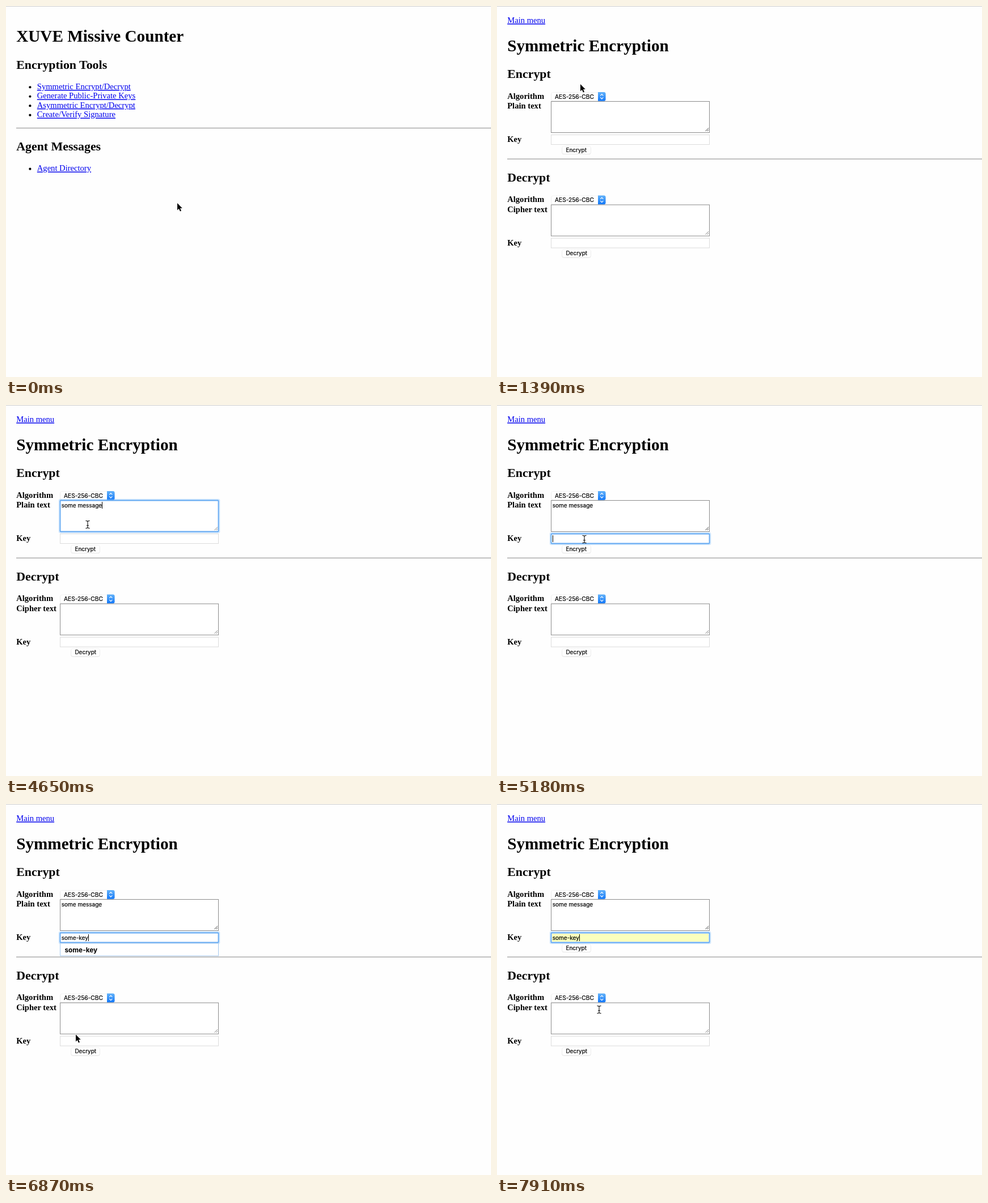
An HTML page for the animation above (7.99 s loop, 855x655 px).

```html
<!DOCTYPE html>
<html lang="en">
<head>
<meta charset="utf-8">
<title>Symmetric encryption walkthrough</title>
<style>
  html, body { margin: 0; width: 100%; height: 100%; overflow: hidden; background: #fefefe; }
  svg { display: block; width: 855px; height: 655px; }
  text { font-family: "Liberation Serif", serif; font-size: 14.6px; white-space: pre; }
  .h1 { font-size: 29.2px; font-weight: bold; }
  .h2 { font-size: 21.9px; font-weight: bold; }
  .label { font-weight: bold; }
  .link { fill: #0000ee; text-decoration: underline; text-decoration-skip-ink: none; }
  .ui, .choice { font-family: Inter, sans-serif; font-size: 10px; stroke: #000; stroke-width: .2px; }
  .choice { font-size: 10.2px; }
  .option { font-family: Inter, sans-serif; font-size: 11.8px; font-weight: bold; }
</style>
</head>
<body>
<svg id="stage" viewBox="0 0 855 655">
  <defs>
    <linearGradient id="blue" x2="0" y2="1">
      <stop offset="0" stop-color="#62b2fa"/>
      <stop offset="1" stop-color="#1277f8"/>
    </linearGradient>
  </defs>
</svg>
<script>
const LOOP = 7990, STEP = 85, BLINK = 540;
const OPEN = 1390, FOCUS_TEXT = 1960, FOCUS_KEY = 5180, PICK = 7570;
const LEFT = 18.2, FORM_GAP = 182.5, LINE = 16.45;

const stage = document.getElementById('stage');
const text = (x, y, cls, s) => `<text x="${x}" y="${y}" class="${cls}">${s}</text>`;
const rect = (x, y, w, h, attrs) => `<rect x="${x}" y="${y}" width="${w}" height="${h}" ${attrs}/>`;
const group = (id, ...parts) => `<g id="${id}">${parts.join('')}</g>`;
const rule = y => rect(18, y, 837, 1.2, 'fill="#999"');
const grip = y => `<path d="M367.5 ${y + 53}l5.5-5.5m-2.5 5.5l2.5-2.5" stroke="#777" stroke-width=".9"/>`;
const list = (y, ...names) => names.map((s, i) =>
  `<circle cx="42.4" cy="${y + i * LINE - 3.7}" r="2.1"/>` + text(54.8, y + i * LINE, 'link', s)).join('');

// white control with a soft lower edge
const raised = (x, y, w, h) => rect(x, y + 1, w, h, 'rx="3.5" fill="#dcdcdc"') +
  rect(x + .3, y + .5, w - .6, h - .3, 'rx="3" fill="#fff" stroke="#ececec" stroke-width=".6"');

const button = (y, s) => raised(114.5, y, 51, 14) + text(121.4, y + 10.6, 'ui', s);

const select = y => raised(95.5, y, 96, 15.3) +
  `<path d="M178 ${y}h10.5a3 3 0 0 1 3 3v9.8a3 3 0 0 1-3 3H178z" fill="url(#blue)"/>` +
  `<path d="M182.3 ${y + 6.4}l2.5-2.7 2.5 2.7m-5 3l2.5 2.7 2.5-2.7" fill="none" stroke="#fff" stroke-width="1.2"/>` +
  text(102, y + 11.8, 'choice', 'AES-256-CBC');

const form = (dy, title, label) => `<g transform="translate(0 ${dy})">` +
  text(LEFT, 127, 'h2', title) +
  text(LEFT, 163.7, 'label', 'Algorithm') +
  text(LEFT, 181, 'label', label) +
  text(LEFT, 240.2, 'label', 'Key') +
  select(152) +
  rect(95.5, 168.5, 279, 55, 'fill="#fff" stroke="#8c8c8c"') + grip(168) +
  rect(95.5, 227.5, 279, 17, 'fill="#fff" stroke="#dcdcdc"') +
  button(247, title) + '</g>';

const ring = (id, y, h) => group(id,
  rect(95, y, 280, h, 'rx="1" fill="none" stroke="#7ab9f8" stroke-opacity=".35" stroke-width="4.6"'),
  rect(95.5, y + .5, 279, h - 1, 'rx="1" fill="#fff" stroke="#62a8f2" stroke-width="1.8"'));

stage.innerHTML += rect(0, 0, 855, 1, 'fill="#cfcfcf"') +
  group('menu',
    text(LEFT, 63, 'h1', 'XUVE Missive Counter'),
    text(LEFT, 110.5, 'h2', 'Encryption Tools'),
    list(147, 'Symmetric Encrypt/Decrypt', 'Generate Public-Private Keys',
      'Asymmetric Encrypt/Decrypt', 'Create/Verify Signature'),
    rule(214.9),
    text(LEFT, 255, 'h2', 'Agent Messages'),
    list(291.4, 'Agent Directory')) +
  group('page',
    text(LEFT, 30, 'link', 'Main menu'),
    text(LEFT, 79.5, 'h1', 'Symmetric Encryption'),
    form(0, 'Encrypt', 'Plain text'),
    rule(269.5),
    form(FORM_GAP, 'Decrypt', 'Cipher text'),
    ring('ringPlain', 168, 56), ring('ringKey', 227, 18), grip(168),
    rect(97, 229, 276, 14, 'id="filled" fill="#faffbd"'),
    group('plain', text(97.8, 181, 'ui', '')),
    group('key', text(97.8, 240.2, 'ui', '')),
    group('drop', rect(95.5, 246, 279, 22, 'id="row" stroke="#a5c9ee"'), text(103.5, 262, 'option', 'some-key')),
    rect(0, 0, 1, 12, 'id="caret"')) +
  group('cursor',
    '<path id="arrow" transform="scale(.94)" d="M0 0V13.2L3 10.5 5.2 15.4 7.4 14.5 5.3 9.6H9.3Z" stroke="#fff" stroke-width="1.2" paint-order="stroke"/>',
    '<path id="beam" d="M-3.5-6.6Q-.4-6.6 0-5.2Q.4-6.6 3.5-6.6M0-5.2V5.2M-3.5 6.6Q-.4 6.6 0 5.2Q.4 6.6 3.5 6.6M-2 1.8H2" fill="none" stroke="#111" stroke-width="1.1"/>',
    '<path id="hand" d="M-1.2 8V1.2a1.2 1.2 0 0 1 2.4 0V6q.2-1.5 1.4-1.4t1.2 1.5q.3-1.1 1.4-1t1.1 1.4q.4-.8 1.3-.6t.9 1.6V11q0 1.4-1.1 2.6V15H0V13.4L-4 9.2q-.7-1.2.4-1.7t2.4 1.7Z" fill="#fff" stroke="#111"/>');

const ui = {};
for (const el of stage.querySelectorAll('[id]')) ui[el.id] = el;

const glide = (start, steps, x, y) => ({ start, steps, x, y });
const glides = [
  glide(450, 7, 147, 138),
  glide(1570, 5, 164, 193),
  glide(4650, 1, 144, 211),
  glide(4740, 4, 154, 237),
  glide(6690, 3, 123, 407),
  glide(6960, 5, 126, 257),
  glide(PICK, 5, 180, 363)
];

const burst = (start, pace, chars) => ({ start, pace, chars });
const plainBursts = [burst(2609, 118, 'some messag'), burst(4290, 118, 'e')];
const keyBursts = [burst(5620, 90, 'som'), burst(5980, 178, 'e-key')];

const within = (v, a, b) => v >= a && v < b;
const show = (el, on) => el.setAttribute('visibility', on ? 'inherit' : 'hidden');
const ease = k => k * k * (3 - 2 * k);

// the pointer is sampled at fixed steps, so it hops along each glide
function pointer(t) {
  let x = 302, y = 348;
  for (const g of glides) {
    if (t < g.start) break;
    const k = ease(Math.min(1, (Math.floor((t - g.start) / STEP) + 1) / g.steps));
    x += (g.x - x) * k;
    y += (g.y - y) * k;
  }
  return { x, y };
}

function pointerShape(t, { x, y }) {
  if (t < OPEN) return within(y, 135, 151) && within(x, 55, 220) ? 'hand' : 'arrow';
  const inField = dy => within(y - dy, 168, 224) || within(y - dy, 227, 245);
  return within(x, 95, 375) && (inField(0) || inField(FORM_GAP)) ? 'beam' : 'arrow';
}

// text so far and the time of its last key press
function typing(bursts, t) {
  let shown = '', last = 0;
  for (const { start, pace, chars } of bursts) {
    if (t < start) break;
    const n = Math.min(chars.length, Math.floor((t - start) / pace) + 1);
    shown += chars.slice(0, n);
    last = start + (n - 1) * pace;
  }
  return { shown, last };
}

function draw(t) {
  const inKey = t >= FOCUS_KEY, picked = t >= PICK;
  const plain = typing(plainBursts, t), key = typing(keyBursts, t);
  const at = pointer(t);
  const open = key.shown !== '' && !picked;
  const hover = open && within(at.y, 246, 268);

  show(ui.menu, t < OPEN);
  show(ui.page, t >= OPEN);
  show(ui.ringPlain, within(t, FOCUS_TEXT, FOCUS_KEY));
  show(ui.ringKey, inKey);
  show(ui.filled, hover || picked);
  show(ui.drop, open);
  ui.row.setAttribute('fill', hover ? '#e4e4e4' : '#fff');
  ui.plain.firstChild.textContent = plain.shown;
  ui.key.firstChild.textContent = key.shown;

  const [field, input] = inKey ? [ui.key, key] : [ui.plain, plain];
  const width = input.shown && field.firstChild.getComputedTextLength();
  const focus = picked ? PICK : inKey ? FOCUS_KEY : FOCUS_TEXT;
  const idle = t - Math.max(focus, input.last);
  ui.caret.setAttribute('x', Math.round(97.8 + Number(width)));
  ui.caret.setAttribute('y', inKey ? 230 : 171);
  show(ui.caret, t >= FOCUS_TEXT && idle % (2 * BLINK) < BLINK);

  const shape = pointerShape(t, at);
  ui.cursor.setAttribute('transform', `translate(${at.x} ${at.y})`);
  for (const name of ['arrow', 'beam', 'hand']) show(ui[name], name === shape);
}

const start = performance.now();
function tick() {
  draw((performance.now() - start) % LOOP);
  requestAnimationFrame(tick);
}
tick();
</script>
</body>
</html>
```
